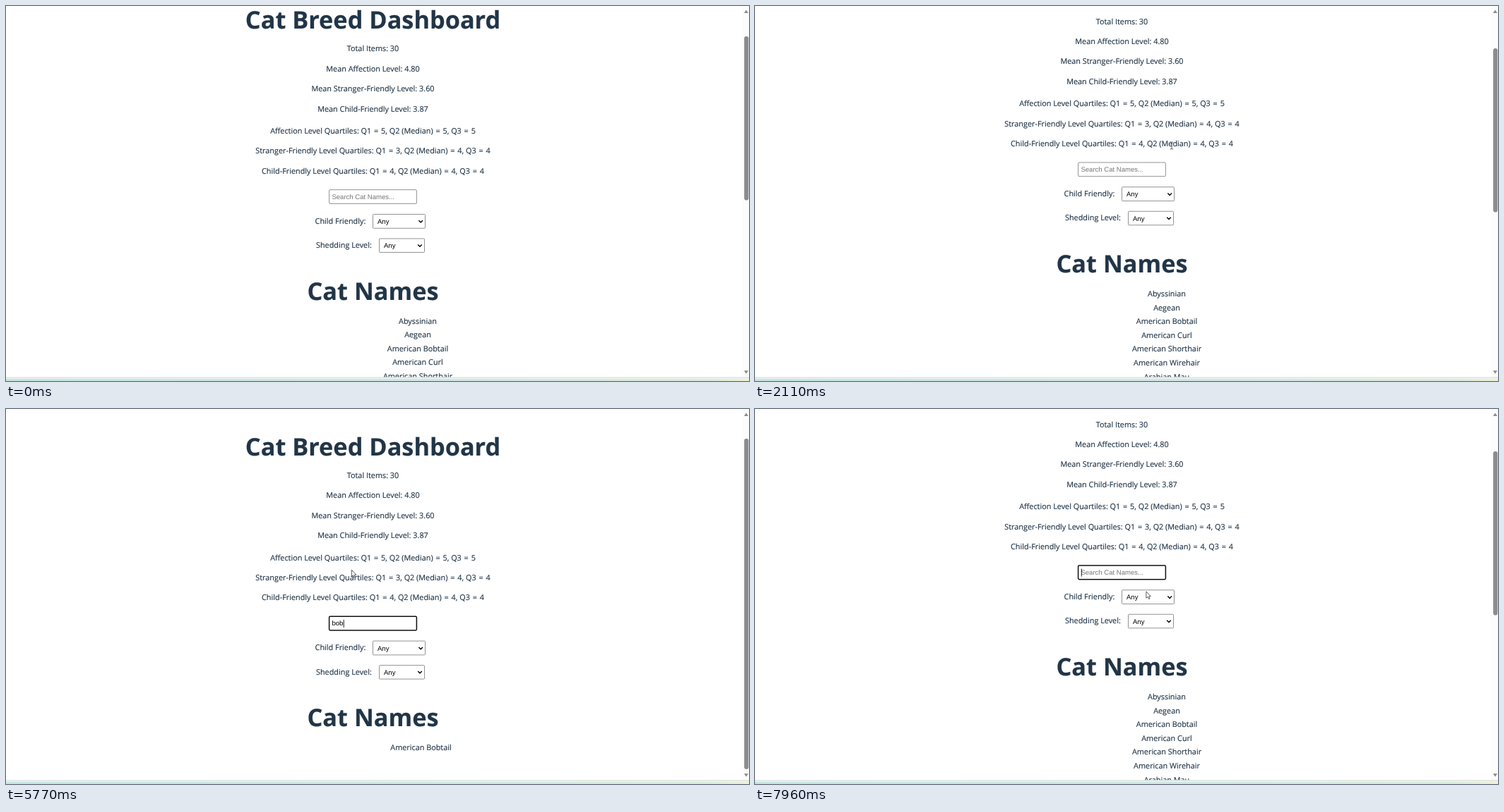
An HTML page for the animation above (8000 ms loop, 1052x532 px).

```html
<!DOCTYPE html>
<html lang="en">
<head>
<meta charset="utf-8">
<title>Cat Breed Dashboard</title>
<style>
  html, body { margin: 0; width: 100%; height: 100%; overflow: hidden; background: #fff; }
  svg { display: block; width: 1052px; height: 532px; }
  text { font: 10.85px "Open Sans", "Noto Sans", sans-serif; fill: #213547; stroke: #213547; stroke-width: .15; text-rendering: geometricPrecision; }
  .mid text, text.mid { text-anchor: middle; }
  text.head { font-size: 34.3px; font-weight: 700; }
  .form text { font: 9.56px "Liberation Sans", Arial, sans-serif; fill: #000; stroke: none; }
  .form #hint { fill: #757575; }
  .box { fill: #fff; stroke: #767676; stroke-width: .8; }
  .box.focus { stroke: #101010; stroke-width: 1.5; }
  .chevron { fill: none; stroke: #000; stroke-width: 1.4; }
  .bar { fill: #8b8b8b; }
</style>
</head>
<body>
<svg viewBox="0 0 1052 532">
  <defs>
    <clipPath id="view"><rect width="1052" height="526.5"/></clipPath>
    <linearGradient id="strip">
      <stop offset="0" stop-color="#c3e6e0"/>
      <stop offset=".6" stop-color="#cde8e0"/>
      <stop offset=".95" stop-color="#d9ecd8"/>
      <stop offset="1" stop-color="#eef2cf"/>
    </linearGradient>
  </defs>
  <rect width="1052" height="532" fill="#fff"/>

  <g clip-path="url(#view)">
    <g id="page">
      <text class="head mid" x="519.5" y="32.2">Cat Breed Dashboard</text>
      <g id="stats" class="mid"></g>
      <text x="437.6" y="308.8">Child Friendly:</text>
      <text x="439" y="343">Shedding Level:</text>
      <g class="form">
        <rect id="input" class="box" x="457.6" y="260.7" width="123.8" height="19.7" rx="1.4"/>
        <text id="hint" x="461.4" y="273.6">Search Cat Names...</text>
        <text id="typed" x="461.4" y="273.6"></text>
        <rect id="caret" y="265.3" width=".9" height="11"/>
        <rect class="box" x="519.5" y="295.5" width="74" height="19.8" rx="1"/>
        <text x="526" y="309">Any</text>
        <path class="chevron" d="M584.4 304.3l2.8 2.8 2.8-2.8"/>
        <rect class="box" x="528.5" y="330" width="64" height="19.5" rx="1"/>
        <text x="535" y="343.3">Any</text>
        <path class="chevron" d="M583.2 338.4l2.8 2.8 2.8-2.8"/>
      </g>
      <text class="head mid" x="519.5" y="416.7">Cat Names</text>
      <g id="names" class="mid"></g>
    </g>
  </g>

  <rect x="1042" width="10" height="526.5" fill="#fcfcfc"/>
  <path class="bar" d="M1045 10l3-4.6 3 4.6zM1045 517.2l3 4.6 3-4.6z"/>
  <rect id="thumb" class="bar" x="1045.2" width="6.2" rx="3.1"/>

  <rect y="526.5" width="1052" height="1.3" fill="#d3d9d9"/>
  <rect y="527.8" width="1052" height="1.2" fill="#f1f6f5"/>
  <rect y="529" width="1052" height="3" fill="url(#strip)"/>

  <path id="arrow" d="M.4.4v9.4l2.1-1.9 1.6 3.2 1.5-.7-1.5-3.1h2.8z" fill="#fff" stroke="#333" stroke-width=".8"/>
  <path id="beam" d="M-2-5h1.4l.6.6.6-.6H2M-2 5h1.4l.6-.6.6.6H2M0-4.4v8.8" fill="none" stroke="#444" stroke-width=".9"/>
</svg>
<script>
const LOOP = 8000;
const $ = id => document.getElementById(id);

const stats = [
  [64.3, 'Total Items: 30'],
  [92.7, 'Mean Affection Level: 4.80'],
  [121.2, 'Mean Stranger-Friendly Level: 3.60'],
  [149.6, 'Mean Child-Friendly Level: 3.87'],
  [181, 'Affection Level Quartiles: Q1 = 5, Q2 (Median) = 5, Q3 = 5'],
  [209.4, 'Stranger-Friendly Level Quartiles: Q1 = 3, Q2 (Median) = 4, Q3 = 4'],
  [237.9, 'Child-Friendly Level Quartiles: Q1 = 4, Q2 (Median) = 4, Q3 = 4']
];
const breeds = ['Abyssinian', 'Aegean', 'American Bobtail', 'American Curl',
  'American Shorthair', 'American Wirehair', 'Arabian Mau', 'Balinese',
  'Bambino', 'Bengal', 'Birman', 'Bombay'];

// Each track lists [start, value...] and holds a value until the next start.
const scroll = [[0, 0], [1770, -16], [1840, -34.5], [1910, -37.6], [1970, -38.7],
  [4300, 14], [5770, 33.6], [6490, 14], [6630, -38.7]];
const query = [[0, ''], [3830, 'b'], [4300, 'bo'], [5770, 'bob'],
  [6490, 'bo'], [6630, 'b'], [6770, '']];
const caret = [[0, 0], [2830, 1], [3440, 0], [3830, 1], [4900, 0], [5370, 1],
  [6290, 0], [6490, 1], [6630, 0], [6770, 1], [7350, 0], [7890, 1]];
const pointer = [
  [0, ''],
  [440, 'arrow', 964, 380], [500, 'arrow', 806, 236], [570, 'arrow', 702, 142], [630, 'arrow', 674, 118],
  [1170, 'arrow', 656, 132], [1240, 'arrow', 626, 161], [1300, 'arrow', 602, 187], [1370, 'beam', 594, 197],
  [2110, 'beam', 590, 198], [2170, 'beam', 578, 201], [2240, 'arrow', 558, 207], [2300, 'arrow', 536, 214],
  [2370, 'arrow', 516, 220], [2430, 'beam', 502, 225], [2500, 'beam', 493, 228], [2560, 'beam', 490, 229],
  [4370, 'arrow', 489, 228], [6630, 'beam', 490, 229],
  [7620, 'beam', 493, 230], [7690, 'beam', 504, 234], [7760, 'beam', 521, 241],
  [7830, 'arrow', 538, 251], [7890, 'arrow', 549, 256.5], [7960, 'arrow', 553.5, 258.5]
];
const at = (track, t) => track.findLast(step => step[0] <= t).slice(1);

const line = (x, y, s) => `<text x="${x}" y="${y}">${s}</text>`;
const widen = s => s.replace(/ = /g, '<tspan dx="1"> =</tspan><tspan dx="1"> </tspan>');
$('stats').innerHTML = stats.map(([y, s]) => line(519.5, y, widen(s))).join('');

function thumbSpan(q, y) {
  if (q === 'b') return [80, 419];
  if (q === 'bo') return [58, 511];
  if (q === 'bob') return [42, 511];
  const top = 43 - y * 0.44;
  return [top, top + 232.5];
}

let shown = null;
function showQuery(q) {
  if (q === shown) return;
  shown = q;
  $('typed').textContent = q;
  $('hint').style.display = q ? 'none' : '';
  $('caret').setAttribute('x', 461.8 + q.length * 5.315);
  $('names').innerHTML = breeds
    .filter(name => name.toLowerCase().includes(q))
    .map((name, i) => line(q ? 587.5 : 583, 450.6 + i * 19.63, name)).join('');
}

function draw(now) {
  const t = now % LOOP;
  const [y] = at(scroll, t), [q] = at(query, t), [kind, px, py] = at(pointer, t);
  $('page').setAttribute('transform', `translate(0 ${y})`);
  showQuery(q);
  $('input').classList.toggle('focus', t >= 2830);
  $('caret').style.display = at(caret, t)[0] ? '' : 'none';
  const [top, bottom] = thumbSpan(q, y);
  $('thumb').setAttribute('y', top);
  $('thumb').setAttribute('height', bottom - top);
  for (const id of ['arrow', 'beam']) {
    $(id).style.display = id === kind ? '' : 'none';
    if (id === kind) $(id).setAttribute('transform', `translate(${px} ${py})`);
  }
}

const start = performance.now();
function tick() {
  draw(performance.now() - start);
  requestAnimationFrame(tick);
}
tick();
</script>
</body>
</html>
```
